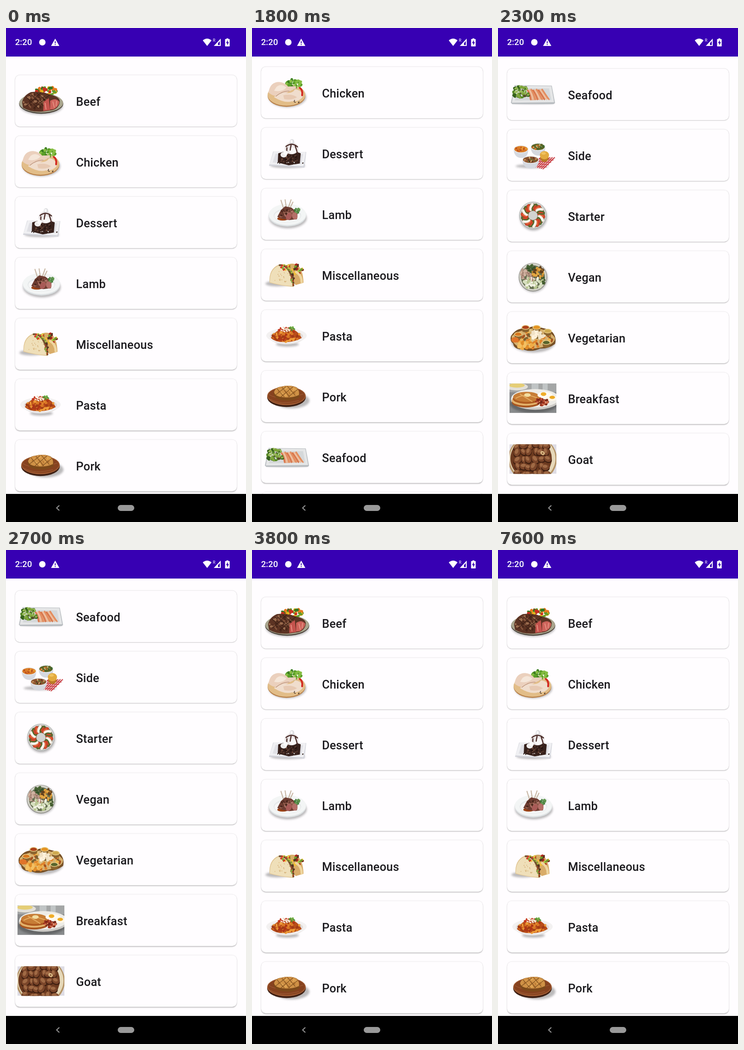
An HTML page that plays this animation: 522x1073 px, repeating every 7.7 s.

```html
<!DOCTYPE html>
<html lang="en">
<head>
<meta charset="utf-8">
<title>Food categories</title>
<style>
@property --scroll { syntax: '<number>'; inherits: true; initial-value: 0; }
html, body { margin: 0; width: 100%; height: 100%; overflow: hidden; background: #fffdff; }
body { position: relative; font-family: Roboto, sans-serif; }
.status, .nav { position: absolute; left: 0; width: 522px; }
.status { top: 0; height: 62px; background: #3700b3; }
.nav { top: 1012px; height: 61px; background: #000; }
.view { position: absolute; top: 62px; width: 522px; height: 950px; overflow: hidden; }
.list { animation: scroll 7700ms step-end infinite; }
.card {
  --y: calc(40.2 + var(--i) * 132 - var(--scroll));
  position: absolute; left: 20px; top: 0; width: 482px; height: 112px;
  transform: translateY(calc(var(--y) * 1px));
  opacity: clamp(0, var(--y) + 92, 1); /* rows past the padded top edge are not drawn */
  border-radius: 10px; background: #fffdff;
  box-shadow: 0 0 2px rgba(0,0,0,.19), 0 calc(.7px + var(--y) * .0018px) 2px rgba(0,0,0,.2);
}
.card svg { position: absolute; left: 0; top: 0; }
.card span {
  position: absolute; left: 132.2px; top: 38px; line-height: 40px;
  font-size: 25.4px; font-weight: 500; letter-spacing: .22px; color: #1c1b1f; white-space: nowrap;
}
@keyframes scroll {
  0% { --scroll: 0; }
  23.376% { --scroll: 150; }
  24.675% { --scroll: 460; }
  25.974% { --scroll: 767; }
  27.272% { --scroll: 938; }
  44.155% { --scroll: 762; }
  45.454% { --scroll: 440; }
  46.753% { --scroll: 130; }
  48.051%, 100% { --scroll: 0; }
}
</style>
</head>
<body>
<div class="view"><div class="list" id="list"></div></div>
<svg class="status" width="522" height="62" fill="#fff">
  <text x="19.7" y="37.4" font-family="Roboto, sans-serif" font-size="18.7" font-weight="500">2:20</text>
  <circle cx="79" cy="31" r="7"/>
  <path d="M107 23L116 39H98Z"/>
  <path d="M107 28.5v5M107 35v2" stroke="#3700b3" stroke-width="1.8"/>
  <path d="M428 27Q437.5 19 447 27L437.5 39Z"/>
  <path d="M467 23V39H452ZM465 28.5L461 33V37H465Z" fill-rule="evenodd"/>
  <text x="450" y="30" font-family="Roboto, sans-serif" font-size="8.5">R</text>
  <path d="M479.5 22.5h4v1.500h2q1 0 1 1v14q0 1 -1 1h-8q-1 0 -1 -1v-14q0 -1 1 -1h2Z"/>
  <path d="M482.5 26L478.5 32.7H481V37.5L485 30.8H482.5Z" fill="#3700b3"/>
</svg>
<svg class="nav" width="522" height="61">
  <path d="M116 25L110 30.500L116 36" fill="none" stroke="#a0a0a0" stroke-width="1.8"/>
  <rect x="243" y="24" width="36" height="13" rx="6.5" fill="#999"/>
</svg>
<script>
let seed = 7;
const rnd = () => (seed = seed * 16807 % 2147483647) / 2147483647;
const range = (n, draw) => Array.from({ length: n }, (_, i) => draw(i)).join('');
const oval = (x, y, rx, ry, fill, turn = 0) =>
  `<ellipse cx="${x}" cy="${y}" rx="${rx}" ry="${ry}" fill="${fill}" transform="rotate(${turn} ${x} ${y})"/>`;
const shape = (d, fill) => `<path d="${d}" fill="${fill}"/>`;
const line = (d, stroke, w = 1.5) =>
  `<path d="${d}" fill="none" stroke="${stroke}" stroke-width="${w}" stroke-linecap="round"/>`;
const soft = (x, y, rx, ry) => `<g filter="url(#blur)">${oval(x, y, rx, ry, '#0004')}</g>`;

// Small random pieces scattered inside an ellipse
const bits = (n, x, y, rx, ry, size, colors) => range(n, i => {
  const a = rnd() * 6.283, r = Math.sqrt(rnd());
  return oval((x + Math.cos(a) * r * rx).toFixed(1), (y + Math.sin(a) * r * ry).toFixed(1),
    size * (.7 + rnd() * .6), size * (.5 + rnd() * .4), colors[i % colors.length], rnd() * 180);
});

const bowl = (x, y, r, food) =>
  shape(`M${x - r} ${y}Q${x - r + 1} ${y + 18} ${x} ${y + 19}T${x + r} ${y}Z`, '#d5d8df') +
  oval(x, y, r, 8.5, '#eceef2') + oval(x, y, r - 1.5, 7, food[0]) + bits(26, x, y, r - 3, 5.5, 2.2, food);

// Lump of stewed meat with a shaded underside and a lit top
const lump = (x, y, r, turn) => oval(x, y + 2, r + 1, r * .85, '#3f1f11', turn) +
  oval(x, y, r, r * .78, '#7b462a', turn) + oval(x - 1, y - 2, r * .65, r * .4, '#a06a45', turn);

const photo = (bg, inner) =>
  `<g clip-path="url(#photo)"><rect x="5" y="24" width="102" height="64" fill="${bg}"/>${inner}</g>`;

const foods = {
  Beef: () => soft(57, 67, 47, 19) + oval(56.5, 62, 48, 22, '#4c463c') + oval(56.5, 60.5, 47.5, 21, '#aaa68e') +
    oval(56, 61, 41, 17, '#8d8469') +
    bits(44, 67, 36, 23, 9, 4.4, ['#37761f', '#e4b51e', '#c92f20', '#5f9a2d', '#e8791f']) +
    shape('M15 59Q18 44 34 37Q55 34 78 43Q96 47 97 57Q95 72 82 76L62 79Q36 82 17 71Z', '#5c3323') +
    bits(50, 43, 57, 25, 16, 3, ['#84543c', '#4a271a', '#9a6c4e']) +
    line('M24 48L50 72M34 42L62 67M47 39L72 59M25 67L56 38M40 72L75 43', '#3b2016', 1.3) +
    shape('M62 58L73 50L76 76L61 78Z', '#c5534d') + shape('M76 56Q88 48 96 58Q95 68 84 74L76 75Z', '#cd625a') +
    line('M65 61L67 74M82 58L85 70M90 57L89 67', '#e69182', 2),
  Chicken: () => soft(57, 66, 41, 22) + oval(55, 63, 41, 24, '#b9824b') + oval(55, 61, 41, 23.5, '#e2bd88') +
    bits(38, 71, 38, 18, 9, 4, ['#5a9e28', '#86bd42', '#3b7d22']) +
    shape('M16 56Q19 33 39 33Q52 34 58 43L75 42L76 47Q61 52 48 62Q30 68 16 56Z', '#ebd0bd') +
    shape('M28 66Q39 52 55 57Q70 57 73 49Q88 50 91 64Q84 76 67 75Q51 80 28 66Z', '#f0ddcd') +
    shape('M33 44Q43 35 55 45Q45 56 28 52Z', '#f5e6d9') + shape('M48 62Q65 58 78 66Q65 74 50 70Z', '#e7c9b3') +
    line('M32 64Q47 52 61 53', '#c39a82', 1.5) + line('M84 46Q91 50 89 62', '#d22922', 4) +
    bits(5, 78, 75, 9, 3, 1.3, ['#392820']),
  Dessert: () => soft(58, 83, 38, 5) + shape('M26 52L98 53L94 87L17 83Z', '#d2d3da') +
    shape('M27 52L97 53L92 84L18 80Z', '#f0f0f3') + shape('M31 57L91 58L87 79L25 76Z', '#e0e0e5') +
    shape('M37 56L64 48L86 56L84 78L60 82L36 76Z', '#36211c') +
    bits(34, 60, 68, 22, 10, 2.2, ['#51342a', '#24120f', '#694537']) +
    oval(66, 45, 15, 13, '#e9e4e5') + oval(68, 50, 8, 7, '#f9f7f7') + oval(67, 31, 5, 6, '#dedee1') +
    oval(66, 30, 2.5, 3, '#faf9fa') + line('M54 41Q67 31 79 42M56 44L55 57M65 38L63 49M74 40L79 56', '#482925', 2.4) +
    oval(49, 59, 7, 6, '#eeecec') + oval(53, 55, 5, 5, '#faf9f9') +
    bits(10, 62, 78, 31, 4, 1.4, ['#31201b', '#f8f8f8']),
  Lamb: () => soft(58, 65, 41, 22) + oval(57, 59, 41, 24, '#dce0e2') + oval(57, 57, 40.5, 23, '#f3f5f5') +
    oval(57, 59, 30, 15, '#e6e9ea') + oval(57, 60, 28, 13, '#f7f8f8') + oval(47, 66, 12, 4, '#9a4215') +
    line('M50 48L43 26M55 44L52 25M58 45L65 25M62 44L69 30', '#c8b7a5', 2.2) +
    shape('M35 62L43 47L52 39L66 42L79 53L78 67L61 69L45 66Z', '#6e3c31') +
    bits(30, 56, 56, 15, 10, 2.8, ['#4b281e', '#925c4b', '#ad7467']) +
    oval(60, 61, 6, 8, '#a95b57', 28) + oval(73, 60, 6, 8, '#b56f68', -12) +
    bits(18, 78, 48, 6, 6, 2.3, ['#407a39', '#659953']),
  Miscellaneous: () => soft(35, 75, 26, 6) +
    shape('M48 45Q58 27 76 33Q91 41 92 73L75 78Z', '#d9ac69') +
    bits(52, 68, 45, 22, 12, 3, ['#6f9e2b', '#ae271b', '#efbd37', '#59351f', '#a9c642']) +
    shape('M18 73Q16 43 38 34Q57 29 66 54Q72 69 70 82Q43 80 18 73Z', '#e0c492') +
    shape('M19 72Q18 45 38 36Q54 34 62 55Q67 68 67 80Q43 79 19 72Z', '#efdfb9') +
    bits(18, 44, 60, 20, 14, 1.3, ['#cfa970', '#ddbd83']) +
    line('M40 35Q56 34 64 54Q70 67 70 79', '#76522f', 4) +
    bits(26, 54, 40, 14, 6, 2.3, ['#7fab31', '#d33826', '#f1c34d']) +
    bits(18, 68, 66, 3, 13, 2.3, ['#86a742', '#b34224', '#563221']) +
    line('M76 50Q88 57 88 72', '#efd6a1', 5),
  Pasta: () => soft(57, 75, 25, 5) + shape('M12 57Q25 75 56 75Q88 74 99 56Z', '#e6e4e4') +
    oval(55, 56, 44, 16, '#f3f1f1') + oval(55, 57, 36, 12, '#e2dddb') +
    shape('M21 61Q34 40 58 38Q79 43 88 61Q73 70 53 70Q31 71 21 61Z', '#b94d19') +
    bits(65, 55, 57, 30, 12, 3.2, ['#d97725', '#ae3317', '#ed9b38', '#a23c16']) +
    bits(24, 50, 43, 13, 5, 2.4, ['#f2e2ce', '#fff7e8', '#c63721']) +
    bits(11, 67, 41, 6, 4, 2.5, ['#4d9332', '#72ad45']),
  Pork: () => soft(66, 65, 39, 17) + oval(55, 58, 42, 21, '#3f2014') + oval(55, 55, 42, 20, '#a05a32') +
    oval(55, 54.5, 40, 18, '#86421f') + line('M20 62Q42 76 82 65M17 52Q40 67 91 51', '#a2613a', 1) +
    shape('M27 49Q30 36 42 35Q64 30 78 37Q85 45 83 58Q66 68 45 64Q29 62 27 49Z', '#7c491a') +
    shape('M28 46Q32 36 43 35Q64 30 77 37Q84 44 82 53Q63 61 43 57Q29 55 28 46Z', '#cf9146') +
    bits(26, 55, 46, 23, 9, 2.8, ['#dfa655', '#bd7b34', '#d99a4b']) +
    line('M34 39L50 57M45 36L62 57M57 34L74 54M31 53L54 35M43 57L69 35M59 57L79 41', '#80501f', 1.2),
  Seafood: () => soft(57, 75, 46, 2) + shape('M16 36L97 37L104 74Q103 77 99 77L11 77L8 74Z', '#b8bcc0') +
    shape('M17 37L96 38L102 73L10 74Z', '#e5e6e7') + shape('M22 42L91 43L96 68L17 69Z', '#d5d8da') +
    shape('M43 46L78 45L92 66L50 69Z', '#e0a27f') +
    range(9, i => line(`M${44 + i * 4} ${47 - i % 3}Q${50 + i * 4} 55 ${51 + i * 5} 67`,
      ['#d9744a', '#efc2a2', '#e58c5c'][i % 3], 2.8)) +
    bits(62, 30, 51, 19, 14, 3.4, ['#568727', '#7ea43a', '#35611c', '#98ba58']) +
    bits(6, 29, 55, 14, 9, 2, ['#533e2b']),
  Side: () => soft(54, 80, 36, 4) + shape('M71 60L106 62L78 87L50 80Z', '#eedcdc') +
    range(7, i => line(`M${73 + i * 5} 61L${54 + i * 4} ${80 + i}`, '#c93038', 1.8)) +
    range(4, i => line(`M${69 - i * 5} ${64 + i * 5}l31 3`, '#ca343bbb', 1.8)) +
    bowl(30, 43, 16, ['#d97925', '#e89d35', '#b84a1e']) +
    bowl(67, 38, 16, ['#5b6425', '#d66e28', '#3d672d', '#dec78c']) +
    oval(81, 62, 9, 9, '#ba7a25') + oval(81, 56, 10, 9, '#e3aa3e') + oval(79, 52, 5, 3, '#f0c25d') +
    bowl(51, 66, 18, ['#89512d', '#b37441', '#5d3522', '#d8b179', '#5f813d']),
  Starter: () => soft(57, 58, 30, 30) + oval(56, 55, 30, 30, '#b3b5b3') + oval(56, 54.5, 28.5, 28.5, '#d2d3d1') +
    oval(56, 55, 26, 26, '#83684a') + range(18, i => {
      const a = i * Math.PI / 9, x = 56 + Math.cos(a) * 18.5, y = 55 + Math.sin(a) * 18.5, turn = i * 20 + 28;
      return oval(x, y, 9, 4.4, ['#cf4025', '#f3ece1', '#4d6b2c'][i % 3], turn) +
        oval(x, y, 6, 1.8, ['#e2683f', '#fffaf2', '#c9472b'][i % 3], turn);
    }) + oval(56, 55, 10, 10, '#d2d3d0'),
  Vegan: () => soft(57, 59, 31, 31) + oval(56, 57, 31, 31, '#8c8c84') + oval(56, 56.5, 29.8, 29.8, '#d4d3ca') +
    oval(56, 57, 26, 26, '#667052') + bits(35, 42, 50, 13, 13, 3.8, ['#b99685', '#d0b2a1', '#987567']) +
    bits(18, 53, 38, 12, 8, 3, ['#476333', '#34502a']) +
    bits(30, 68, 48, 12, 12, 4, ['#ca862d', '#62401d', '#e2a642']) +
    bits(32, 57, 70, 21, 11, 4.3, ['#d7dfbf', '#b7c590', '#eff0df']) +
    bits(24, 55, 61, 9, 4, 1.8, ['#f2e5df', '#a77f6b']) + bits(9, 78, 64, 4, 9, 2.3, ['#405a2c']),
  Vegetarian: () => soft(57, 65, 48, 24) +
    shape('M8 53Q20 35 37 37L59 31L84 37L98 44Q108 55 104 70Q89 81 72 80Q53 89 35 82Q14 82 13 69Q5 64 8 53Z', '#785025') +
    shape('M10 53Q23 40 58 36Q91 37 104 57Q105 68 85 75Q55 84 26 77Q9 68 10 53Z', '#d6b06e') +
    bits(70, 56, 59, 42, 19, 4, ['#e0832a', '#a5521f', '#edb44c', '#7d6130', '#dcc48a']) +
    [[40, 34], [64, 34], [88, 42], [24, 49], [85, 67]].map(([x, y], i) =>
      shape(`M${x - 9} ${y}l2 9q7 4 14 0l2 -9Z`, '#8c652f') + oval(x, y, 9, 5, '#ead18c') +
      oval(x, y, 7.3, 3.6, ['#ad421a', '#e49425', '#cea950', '#d87820', '#59642c'][i])).join('') +
    bits(26, 66, 51, 13, 9, 4.2, ['#fff2dc', '#f0e2c6']) +
    bits(18, 41, 72, 17, 7, 5.5, ['#f0ab45', '#e08d2a', '#f4c062']) + oval(17, 61, 8, 6, '#e0742a'),
  Breakfast: () => photo('#898b8d',
    shape('M5 24H107V43H5Z', '#a4a6a6') + shape('M53 24H68V42H53ZM77 24H88V43H77Z', '#c0c4c5') +
    oval(21, 31, 24, 8, '#e2dfd8') + oval(21, 28, 17, 5, '#e5ce76') +
    soft(58, 68, 52, 20) + oval(61, 59, 53, 22, '#cccac6') + oval(61, 56, 52, 20, '#eeece7') +
    oval(41, 65, 31, 11, '#a85620') + oval(41, 61, 31, 11, '#e3b16a') +
    oval(42, 57, 30, 11, '#af5b20') + oval(42, 53, 29, 11, '#c77d36') +
    line('M19 56Q39 44 64 55M28 47L54 63', '#e4ac63', 2) + oval(44, 49, 7, 4, '#f3dda0') +
    oval(82, 49, 16, 7, '#fffaf0') + oval(79, 47, 6, 4, '#efad2a') +
    oval(96, 56, 13, 6, '#fff7e9') + oval(98, 54, 6, 3.5, '#ecaa25') +
    bits(30, 76, 63, 13, 8, 3, ['#9e321e', '#d77552', '#792719'])),
  Goat: () => photo('#dedce4',
    oval(55, 56, 53, 51, '#b59467') + oval(55, 55, 50, 48, '#e6d8b9') + oval(52, 55, 45, 44, '#6c3a1f') +
    range(30, i => lump(18 + i % 6 * 13 + rnd() * 7, 24 + Math.floor(i / 6) * 15 + rnd() * 6,
      7 + rnd() * 2.5, rnd() * 180)) +
    oval(77, 43, 5, 4, '#e1bf89', 30) + oval(77, 43, 2, 1.5, '#7a4a2a'))
};

const defs = `<defs><filter id="blur" x="-30%" y="-60%" width="160%" height="220%"><feGaussianBlur stdDeviation="2"/></filter>
  <clipPath id="photo"><rect x="5" y="24" width="102" height="64"/></clipPath></defs>`;
document.getElementById('list').innerHTML = Object.entries(foods).map(([name, draw], i) =>
  `<div class="card" style="--i:${i}"><svg width="112" height="112">${i ? '' : defs}${draw()}</svg><span>${name}</span></div>`
).join('');
</script>
</body>
</html>
```
